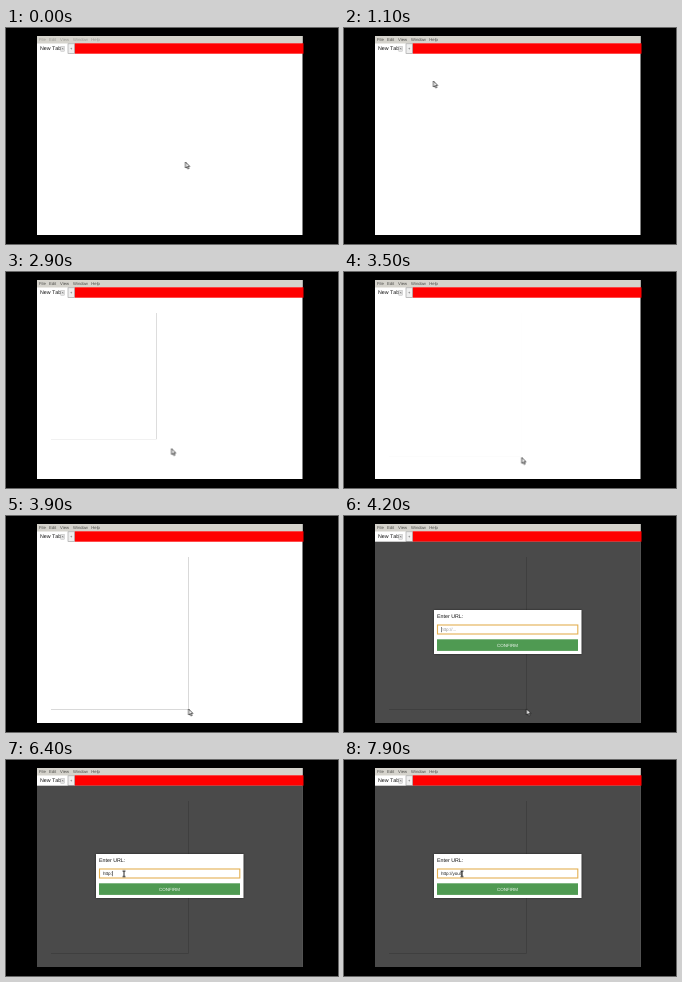
An HTML page for the animation above (8000 ms loop, 332 by 216 pixels).

```html
<!DOCTYPE html>
<html lang="en">
<head>
<meta charset="utf-8">
<title>New tab: draw a frame, enter a URL</title>
<style>
  html, body { margin: 0; width: 100%; height: 100%; overflow: hidden; background: #000; }
  svg { display: block; width: 100vw; height: 100vh; }
  text { font-family: "Liberation Sans", Arial, sans-serif; font-kerning: none; text-rendering: geometricPrecision; white-space: pre; }

  .menu text { font-size: 4.2px; fill: #4b4b48; }
  .tab { font-size: 5.3px; fill: #111; }
  .sign { font-size: 4px; fill: #444; text-anchor: middle; }
  .field { font-size: 4.6px; }

  .menu, .panel, .modal, .hint, .caret, .pointer, .arrow, .beam {
    animation: 8s linear infinite;
  }
  .menu    { animation-name: focus; animation-timing-function: step-end; }
  .panel   { animation-name: drag; fill: #fff; filter: drop-shadow(0 .6px .6px rgba(0, 0, 0, .6)); }
  .modal   { animation-name: open; animation-timing-function: step-end; }
  .hint    { animation-name: clear; animation-timing-function: step-end; fill: #999; }
  .caret   { animation-name: type; animation-timing-function: step-end; }
  .pointer { animation-name: move; }
  .arrow   { animation-name: leave; animation-timing-function: step-end; }
  .beam    { animation-name: enter; animation-timing-function: step-end; }

  @keyframes focus { 0% { opacity: .4; } 1.25%, 100% { opacity: 1; } }
  @keyframes open  { 0% { opacity: 0; } 52.5%, 100% { opacity: 1; } }
  @keyframes clear { 0% { opacity: 1; } 71.25%, 100% { opacity: 0; } }
  @keyframes leave { 0% { opacity: 1; } 60.6%, 100% { opacity: 0; } }
  @keyframes enter { 0% { opacity: 0; } 60.6%, 100% { opacity: 1; } }

  /* The panel trails the pointer by 100 ms. */
  @keyframes drag {
    0%, 28.74%  { width: 1px; height: 1px; opacity: 0; }
    28.75%      { width: 1px; height: 1px; opacity: 1; }
    30%         { width: 4px; height: 5px; }
    32.5%       { width: 40px; height: 49px; }
    36.25%      { width: 105.5px; height: 126px; }
    37.5%       { width: 121px; height: 136px; }
    40%, 43.75% { width: 132px; height: 143px; }
    48.75%, 100% { width: 137.5px; height: 152.5px; opacity: 1; }
  }

  @keyframes move {
    0%, 1%       { transform: translate(179.5px, 134px); }
    11.25%       { transform: translate(149px, 53px); }
    13.75%       { transform: translate(89.5px, 53px); }
    16.25%       { transform: translate(65px, 48px); }
    22.5%        { transform: translate(46px, 40px); }
    23.75%, 27.5% { transform: translate(45px, 40px); }
    28.75%       { transform: translate(49px, 46px); }
    31.25%       { transform: translate(85px, 90px); }
    35%          { transform: translate(150px, 167px); }
    36.25%       { transform: translate(165.5px, 176.5px); }
    38.75%, 42.5% { transform: translate(176.5px, 183.5px); }
    48.75%, 52.5% { transform: translate(182.6px, 193px); }
    61.25%       { transform: translate(117px, 113.5px); }
    65%, 100%    { transform: translate(118px, 113.8px); }
  }

  /* Offsets are the typed text's width. */
  @keyframes type {
    0%     { transform: translateX(0); }
    71.25% { transform: translateX(.556em); }
    73.75% { transform: translateX(1.112em); }
    76.25% { transform: translateX(1.668em); }
    80%    { transform: translateX(1.946em); }
    83.75% { transform: translateX(2.224em); }
    85%    { transform: translateX(2.502em); }
    92.5%  { transform: translateX(3.002em); }
    93.75% { transform: translateX(3.558em); }
    96.25% { transform: translateX(4.114em); }
    98.75%, 100% { transform: translateX(4.392em); }
  }
</style>
</head>
<body>
<svg viewBox="0 0 332 216">
  <rect width="332" height="216"/>
  <rect x="31" y="8" width="265.5" height="199" fill="#fff"/>

  <rect x="31" y="8" width="265.5" height="7.5" fill="#d5d3cc"/>
  <g class="menu">
    <text x="33" y="13.3">File</text>
    <text x="43" y="13.3">Edit</text>
    <text x="54" y="13.3">View</text>
    <text x="67" y="13.3">Window</text>
    <text x="85.3" y="13.3">Help</text>
  </g>

  <rect x="68.5" y="15.3" width="229" height="10.4" fill="#f00"/>
  <text class="tab" x="34" y="22.2">New Tab</text>
  <rect x="54.8" y="18.2" width="3.6" height="5" fill="#e6e6e6" stroke="#aaa" stroke-width=".4"/>
  <text class="sign" x="56.6" y="21.8">×</text>
  <rect x="62" y="15.8" width="6.4" height="9.6" fill="#eee" stroke="#999" stroke-width=".6"/>
  <text class="sign" x="65.2" y="22">+</text>

  <rect class="panel" x="45" y="41"/>

  <g class="modal">
    <rect x="31" y="25.7" width="265.5" height="181.3" fill="#000" opacity=".71"/>
    <rect x="90" y="94" width="147.5" height="44" fill="#fff" style="filter: drop-shadow(0 .6px 1px rgba(0, 0, 0, .6))"/>
    <text class="tab" x="93" y="102.2">Enter URL:</text>
    <rect x="93.5" y="109" width="140.3" height="9" fill="#fff" stroke="#e3b052" stroke-width="1.1"/>
    <g class="field">
      <text x="97" y="115.2" fill="#222">http://yout</text>
      <g class="caret">
        <rect x="97" y="110.5" width="24" height="6.5" fill="#fff"/>
        <rect x="97" y="111" width=".5" height="5.2"/>
      </g>
      <text class="hint" x="97" y="115.2">http://...</text>
    </g>
    <rect x="93" y="123.3" width="141" height="11.6" fill="#4f9a52"/>
    <text x="163.6" y="130.6" font-size="4.5" fill="#f2f7f2" text-anchor="middle">CONFIRM</text>
  </g>

  <g class="pointer">
    <path class="arrow" d="M0 0V6L1.4 4.8L2.4 7L3.4 6.5L2.4 4.4H4.2Z" fill="#fff" stroke="#111" stroke-width=".7"/>
    <path class="beam" d="M-1.5 -2.8H1.5M0 -2.8V2.8M-1.5 2.8H1.5" fill="none" stroke="#111" stroke-width=".9"/>
  </g>
</svg>
</body>
</html>
```
